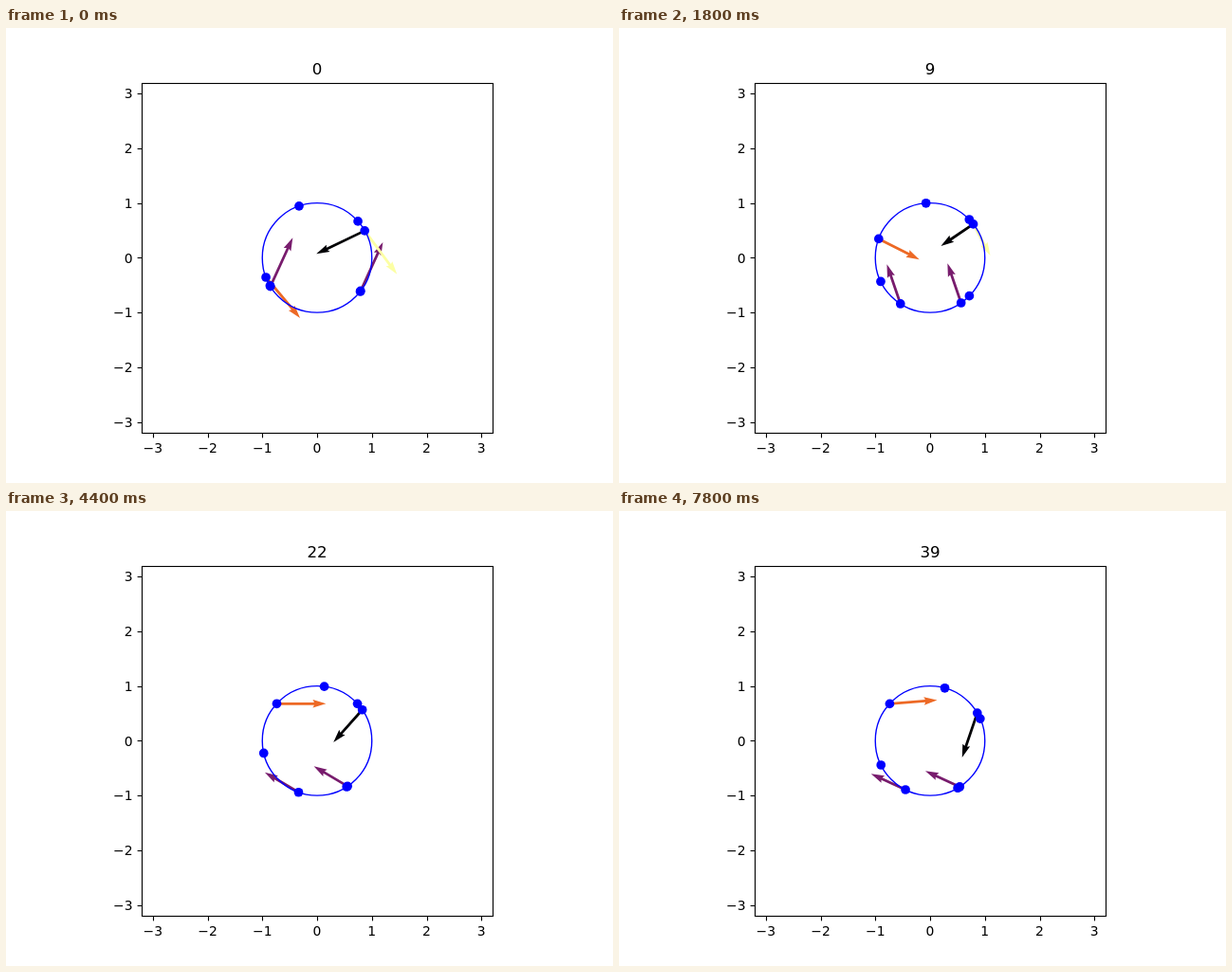
An HTML page with a canvas for the animation above (8000 ms loop, 640 by 480 pixels).

```html
<!DOCTYPE html>
<html>
<head>
<meta charset="utf-8">
<style>
  html, body { margin: 0; width: 100%; height: 100%; overflow: hidden; background: #fff; }
  canvas { display: block; }
</style>
</head>
<body>
<canvas id="stage" width="640" height="480"></canvas>
<script>
const ctx = document.getElementById('stage').getContext('2d');
const STEP_MS = 200, STEPS = 40;
const CX = 328, CY = 242.4, UNIT = 57.75;
const FONT = '"DejaVu Sans", sans-serif';

// Every track below holds one value per key step.
const KEYS = [0, 6, 13, 18, 27, 33, 36, 39];

// Angles on the circle, in degrees.
const points = {
  top: [109.2, 100.6, 87.9, 87, 77, 77, 75.8, 74.4],
  upper: [41.8, 46, 41.8, 43.2, 40.3, 29.2, 26, 23.8],
  right: [29.6, 34, 41.8, 41.4, 25.1, 28.6, 29.8, 30.5],
  left: [200.9, 168.7, 150.4, 139.9, 136, 138.9, 138, 137.5],
  lower: [210.8, 209.8, 197.8, 192.8, 194, 200, 203, 206.3],
  bottom: [211.6, 231.7, 243.3, 250.9, 248.6, 246.4, 245, 243.3],
  base: [-38, -40.6, -50.3, -55.3, -59.3, -61.9, -61, -59.7],
  corner: [-37.4, -57.5, -52.5, -58.8, -52.5, -55.3, -56, -57.2]
};

// Arrow vectors in pixels.
const purple = {
  color: '#781c6d',
  dx: [23.5, -7, -22, -32, -39, -43, -45, -36.3],
  dy: [-51.5, -48, -32, -27.2, -14.3, -11.7, -13, -16.7]
};
const arrows = [
  { from: 'left', color: '#ed6925',
    dx: [36, 42, 44, 50, 53, 51, 50.5, 50], dy: [43, 28, 14, 4, -3, -4, -4, -4] },
  { from: 'bottom', ...purple },
  { from: 'corner', ...purple },
  { from: 'right', color: '#fcffa4',
    dx: [34, 24, 10, 3, 0, 0, 0, 0], dy: [46, 44, 13, 4, 0, 0, 0, 0] },
  { from: 'right', color: '#000004',
    dx: [-51, -31, -39, -36, -25, -27, -22, -16], dy: [24.5, 18, 31, 28, 46, 52, 50, 47] }
];

// Monotone cubic through the key values, so that nothing overshoots.
function sample(values, step) {
  let i = 0;
  while (i < KEYS.length - 2 && step >= KEYS[i + 1]) i++;
  const slope = k => (values[k + 1] - values[k]) / (KEYS[k + 1] - KEYS[k]);
  const tangent = k => {
    if (k === 0) return slope(0);
    if (k === KEYS.length - 1) return slope(k - 1);
    const a = slope(k - 1), b = slope(k);
    return a * b > 0 ? 2 * a * b / (a + b) : 0;
  };
  const span = KEYS[i + 1] - KEYS[i], u = (step - KEYS[i]) / span, v = 1 - u;
  return values[i] * v * v * (1 + 2 * u) + values[i + 1] * u * u * (3 - 2 * u)
    + span * u * v * (tangent(i) * v - tangent(i + 1) * u);
}

function pointAt(name, step) {
  const angle = sample(points[name], step) * Math.PI / 180;
  return [CX + UNIT * Math.cos(angle), CY - UNIT * Math.sin(angle)];
}

function line(x1, y1, x2, y2) {
  ctx.beginPath();
  ctx.moveTo(x1, y1);
  ctx.lineTo(x2, y2);
  ctx.stroke();
}

function drawArrow(arrow, step) {
  const dx = sample(arrow.dx, step), dy = sample(arrow.dy, step);
  const length = Math.hypot(dx, dy), width = 0.0075 * 6.4 * UNIT;
  if (length < width) return;
  const w = width * Math.min(1, length / (5 * width));
  const neck = length - 4.5 * w, barb = length - 5 * w;
  ctx.save();
  ctx.translate(...pointAt(arrow.from, step));
  ctx.rotate(Math.atan2(dy, dx));
  ctx.beginPath();
  for (const [x, y] of [
    [0, -w / 2], [neck, -w / 2], [barb, -1.5 * w], [length, 0],
    [barb, 1.5 * w], [neck, w / 2], [0, w / 2]
  ]) ctx.lineTo(x, y);
  ctx.fillStyle = arrow.color;
  ctx.fill();
  ctx.restore();
}

function drawAxes() {
  ctx.strokeStyle = ctx.fillStyle = '#000';
  ctx.lineWidth = 1.11;
  ctx.strokeRect(143.5, 58.5, 370, 369);
  ctx.font = `13.89px ${FONT}`;
  for (let n = -3; n <= 3; n++) {
    const label = String(n).replace('-', '\u2212');
    const x = CX + n * UNIT, y = CY - n * UNIT;
    const tickX = Math.round(x) + 0.5, tickY = Math.round(y) + 0.5;
    line(tickX, 427.5, tickX, 432.4);
    line(143.5, tickY, 138.6, tickY);
    ctx.textAlign = 'center';
    ctx.fillText(label, x, 448);
    ctx.textAlign = 'right';
    ctx.fillText(label, 133.5, Math.round(y + 5.2));
  }
}

function draw(step) {
  ctx.fillStyle = '#fff';
  ctx.fillRect(0, 0, 640, 480);
  for (const arrow of arrows) drawArrow(arrow, step);

  ctx.strokeStyle = ctx.fillStyle = '#00f';
  ctx.lineWidth = 1.39;
  ctx.beginPath();
  ctx.arc(CX, CY, UNIT, 0, 2 * Math.PI);
  ctx.stroke();
  for (const name in points) {
    ctx.beginPath();
    ctx.arc(...pointAt(name, step), 4.86, 0, 2 * Math.PI);
    ctx.fill();
  }

  drawAxes();
  ctx.font = `16.67px ${FONT}`;
  ctx.textAlign = 'center';
  ctx.fillText(step, CX, 49);
}

const start = performance.now();
function tick() {
  draw(Math.floor((performance.now() - start) / STEP_MS) % STEPS);
  requestAnimationFrame(tick);
}
tick();
</script>
</body>
</html>
```
